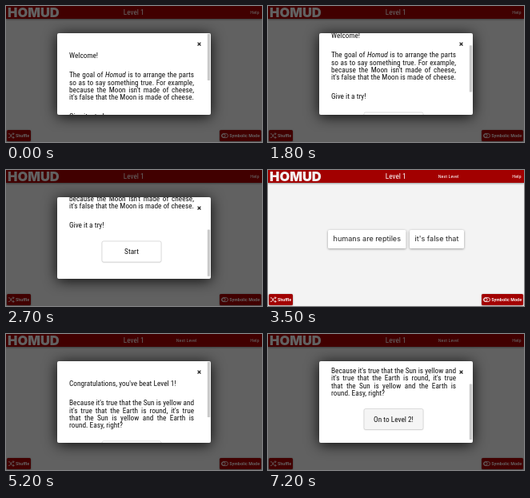
An HTML page with a canvas that plays this animation: 320 by 170 pixels, repeating every 8000 ms.

```html
<!DOCTYPE html>
<html lang="en">
<head>
<meta charset="utf-8">
<title>Homud</title>
<style>
  html, body { margin: 0; height: 100%; overflow: hidden; background: #f3f3f3; }
  canvas { display: block; width: 100vw; height: 100vh; }
</style>
</head>
<body>
<canvas id="stage"></canvas>
<script>
const canvas = document.getElementById('stage');
const ctx = canvas.getContext('2d');
const LOOP = 8000;
const RED = '#a20000';
const CONDENSED = '"Roboto Condensed", Roboto, sans-serif';
const CARD_FONT = '9.1px Inter, sans-serif';
const LEFT = 79, COLUMN = 156, LINE = 9.3;
const VIEW = { x: 64, y: 34, w: 192, h: 102 };

const scale = innerWidth / 320 * devicePixelRatio;
canvas.width = Math.round(320 * scale);
canvas.height = Math.round(170 * scale);

// Without a condensed face, narrow the regular one uniformly.
const sampleWidth = font => {
  ctx.font = font;
  return ctx.measureText('Congratulations').width;
};
const narrow = sampleWidth(`condensed 100px ${CONDENSED}`) <
  sampleWidth('100px Roboto, sans-serif') * 0.95 ? 1 : 0.88;

const welcome = {
  title: 'Welcome!',
  lines: ['The goal of _Homud is to arrange the parts',
          'so as to say something true. For example,',
          "because the Moon isn't made of cheese,",
          "it's false that the Moon is made of cheese."],
  extra: 'Give it a try!',
  button: 'Start', buttonY: 158, hoverAt: Infinity,
  maxScroll: 74,
  scroll: [[0, 0], [1300, 4], [1400, 10], [1500, 16], [1700, 22], [1800, 25],
           [2000, 33], [2200, 42], [2300, 54], [2400, 66], [2700, 69]]
};
const success = {
  title: "Congratulations, you've beat Level 1!",
  lines: ["Because it's true that the Sun is yellow and",
          "it's true that the Earth is round, it's true",
          'that the Sun is yellow and the Earth is'],
  lastLine: 'round. Easy, right?',
  button: 'On to Level 2!', buttonY: 134, hoverAt: 7200,
  maxScroll: 46,
  scroll: [[0, 0], [6600, 9.5], [6700, 17], [6800, 25], [6900, 32],
           [7000, 38], [7200, 40.5]]
};

const clamp = v => Math.max(0, Math.min(1, v));
const easeInOut = u => u < 0.5 ? 2 * u * u : 1 - 2 * (1 - u) ** 2;
const mix = (a, b, u) => a + (b - a) * u;
const valueAt = (steps, t) => steps.filter(([start]) => start <= t).pop()[1];

function shadow(color, blur, dy = 0) {
  ctx.shadowColor = color;
  ctx.shadowBlur = blur * scale;
  ctx.shadowOffsetY = dy * scale;
}

function box(x, y, w, h, r, fill, stroke) {
  ctx.beginPath();
  ctx.roundRect(x, y, w, h, r);
  ctx.fillStyle = fill;
  ctx.fill();
  ctx.shadowColor = 'transparent';
  if (stroke) {
    ctx.strokeStyle = stroke;
    ctx.lineWidth = 0.6;
    ctx.stroke();
  }
}

function setFont(size, style = '') {
  ctx.font = `${style} condensed ${size}px ${CONDENSED}`;
}

function text(str, x, y, color, align = 'left') {
  ctx.save();
  ctx.translate(x, y);
  ctx.scale(narrow, 1);
  ctx.textAlign = align;
  ctx.fillStyle = color;
  ctx.fillText(str, 0, 0);
  ctx.restore();
}

function justified(line, y) {
  const words = line.split(' ').map(raw => {
    const style = raw[0] === '_' ? 'italic' : '';
    const word = raw.replace('_', '');
    setFont(LINE, style);
    return { word, style, width: ctx.measureText(word).width * narrow };
  });
  const used = words.reduce((sum, w) => sum + w.width, 0);
  const gap = (COLUMN - used) / (words.length - 1);
  let x = LEFT;
  for (const { word, style, width } of words) {
    setFont(LINE, style);
    text(word, x, y, '#111');
    x += width + gap;
  }
}

function stroke(path, color, width) {
  ctx.strokeStyle = color;
  ctx.lineWidth = width;
  ctx.stroke(new Path2D(path));
}

function drawHeader(showNext) {
  shadow('rgba(0,0,0,.4)', 2, 0.5);
  box(0, 0, 320, 16, 0, RED);
  ctx.font = '900 16.5px Inter, sans-serif';
  ctx.textAlign = 'left';
  ctx.fillStyle = '#f4f4f4';
  ctx.fillText('HOMUD', 2, 14);
  setFont(9.3);
  text('Level 1', 159.7, 11.3, '#fff', 'center');
  setFont(6.2);
  if (showNext) text('Next Level', 225.5, 10.3, '#fff', 'center');
  text('Help', 316.5, 10.3, '#fff', 'right');
}

function footerButton(x, w, label, labelX) {
  shadow('rgba(0,0,0,.5)', 2, 0.5);
  box(x, 155, w, 14, 1.5, RED);
  setFont(6.2, '500');
  text(label, labelX, 164.2, '#fff');
}

function drawFooter() {
  footerButton(1, 30, 'Shuffle', 12);
  stroke('M3 159.8h1.6l3.2 4.6h2.2M3 164.4h1.6l3.2-4.6h2.2' +
         'M8.8 158.4l1.4 1.4-1.4 1.4M8.8 163l1.4 1.4-1.4 1.4', '#fff', 0.8);
  footerButton(267, 52, 'Symbolic Mode', 279.3);
  ctx.beginPath();
  ctx.roundRect(269.5, 159.6, 8, 5, 2.5);
  ctx.strokeStyle = '#fff';
  ctx.lineWidth = 0.8;
  ctx.stroke();
  ctx.beginPath();
  ctx.arc(272, 162.1, 2.1, 0, 7);
  ctx.stroke();
}

function drawCard(label, x, y, w, tilt, isTrue) {
  ctx.save();
  ctx.translate(x + w / 2, y + 11.5);
  ctx.rotate(tilt * Math.PI / 180);
  let fill = '#fff';
  if (isTrue) {
    fill = ctx.createLinearGradient(0, -11.5, 0, 11.5);
    fill.addColorStop(0, '#fff8e4');
    fill.addColorStop(1, '#fbda80');
  }
  shadow('rgba(0,0,0,.4)', 3, 0.8);
  box(-w / 2, -11.5, w, 23, 1.5, fill);
  ctx.font = CARD_FONT;
  ctx.textAlign = 'center';
  ctx.fillStyle = '#222';
  ctx.fillText(label, 0, 2.8);
  ctx.restore();
}

function drawCards(t) {
  const drag = clamp((t - 4200) / 600);
  const slide = clamp((t - 4300) / 300);
  const lift = Math.sin(Math.PI * drag);
  const isTrue = t >= 4600;
  drawCard("it's false that", mix(177, 75, easeInOut(drag)), 75 + 2.6 * lift,
           68, 1.2 * lift, isTrue);
  drawCard('humans are reptiles', mix(75, 147.5, easeInOut(slide)), 75 - 1.8 * lift,
           97.5, 1.2 * lift, isTrue);
}

function drawModal(page, t, alpha) {
  const { x, y, w, h } = VIEW;
  const offset = valueAt(page.scroll, t);
  ctx.save();
  ctx.globalAlpha = alpha;
  box(0, 0, 320, 170, 0, 'rgba(0,0,0,.6)');
  shadow('rgba(0,0,0,.9)', 17, 2);
  box(x, y, w, h, 2, '#fff');

  ctx.save();
  ctx.beginPath();
  ctx.roundRect(x, y, w, h, 2);
  ctx.clip();
  ctx.translate(0, -offset);
  setFont(LINE);
  text(page.title, LEFT, 64.8, '#111');
  page.lines.forEach((line, i) => justified(line, 89.4 + i * LINE));
  setFont(LINE);
  if (page.lastLine) text(page.lastLine, LEFT, 89.4 + page.lines.length * LINE, '#111');
  if (page.extra) text(page.extra, LEFT, 141.3, '#111');
  shadow('rgba(0,0,0,.2)', 1.5, 0.5);
  box(120, page.buttonY, 74, 26, 2, t >= page.hoverAt ? '#f5f5f5' : '#fff', '#ccc');
  text(page.button, 157, page.buttonY + 16.3, '#111', 'center');
  ctx.restore();

  const track = h - 1;
  const ratio = track / (track + page.maxScroll);
  box(251.8, y + 0.7 + offset * ratio, 3.4, track * ratio, 0.5, '#c9c9c9');
  stroke('M239.6 45.7l3.8 3.8m0-3.8l-3.8 3.8', '#111', 1.1);
  ctx.restore();
}

function draw(now) {
  const t = Math.floor(now % LOOP / 100) * 100;
  ctx.setTransform(scale, 0, 0, scale, 0, 0);
  ctx.shadowColor = 'transparent';
  box(0, 0, 320, 170, 0, '#f3f3f3');
  drawHeader(t >= 3500);
  drawFooter();
  if (t >= 3500) drawCards(t);
  if (t < 3500) drawModal(welcome, t, 1);
  else if (t >= 5000) drawModal(success, t, clamp((t - 4900) / 300));
}

const start = performance.now();
function tick() {
  draw(performance.now() - start);
  requestAnimationFrame(tick);
}
tick();
</script>
</body>
</html>
```
